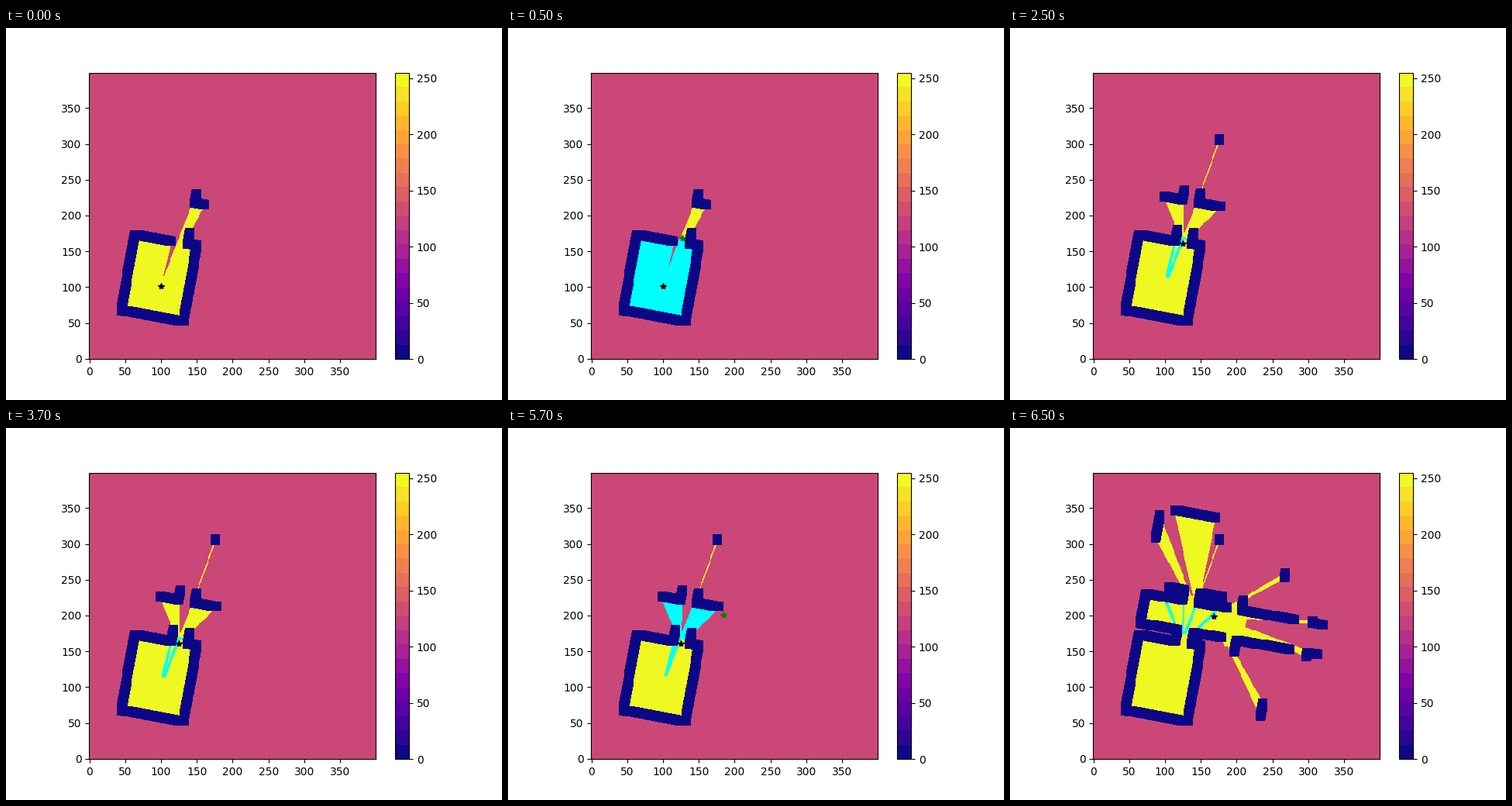
Animation of 640x480 px, one loop 8 s. Source, as a matplotlib script:

```python
import matplotlib.pyplot as plt
import numpy as np
from matplotlib.animation import FuncAnimation

WALL, UNKNOWN, FREE = 0, 128, 255
SIZE = 400
LEFT, BOTTOM, CELL = 107.2, 427.2, 369.6 / SIZE  # map area, in stage pixels

# The building is tilted: "along" runs down the corridor, "across" over it
CORNER = np.array([166.0, 267.0])
TILT = np.radians(10)
ALONG = np.array([np.cos(TILT), np.sin(TILT)])
ACROSS = np.array([-np.sin(TILT), np.cos(TILT)])

DOORS = [(48, 69.5), (106.5, 125), (195, 218)]
ROOMS = [(0, 81.6), (92, 173)]
CORRIDOR = (-54, -15)
CORRIDOR_END = 260
ROOM_SIDES = [(0, 99), (-67, -166)]  # door side and far side of both rows


def to_map(points):
    """Building coordinates to map coordinates."""
    points = np.asarray(points, float)
    stage = CORNER + points[..., :1] * ALONG + points[..., 1:] * ACROSS
    return (stage - (LEFT, BOTTOM)) / (CELL, -CELL) - 0.5


def plot_cells(mask, points):
    col, row = np.moveaxis(np.rint(to_map(points)).astype(int), -1, 0)
    mask[np.clip(row, 0, SIZE - 1), np.clip(col, 0, SIZE - 1)] = True


def grow(mask, n):
    """Widen a mask by n cells on every side."""
    for axis in (0, 1):
        mask = np.any([np.roll(mask, s, axis) for s in range(-n, n + 1)], axis=0)
    return mask


def build_walls():
    walls = [(0, CORRIDOR[0], 0, CORRIDOR[1])]
    ends = [0, *np.ravel(DOORS), CORRIDOR_END]
    for b in (*CORRIDOR, 0, -67):
        walls += [(a0, b, a1, b) for a0, a1 in zip(ends[::2], ends[1::2])]
    for a in np.ravel(DOORS):
        walls += [(a, -15, a, 0), (a, -67, a, -54)]
    for a0, a1 in ROOMS:
        for front, back in ROOM_SIDES:
            walls += [(a0, front, a0, back), (a1, front, a1, back),
                      (a0, back, a1, back)]
    return np.array(walls, float)


def cross(p, q):
    return p[..., 0] * q[..., 1] - p[..., 1] * q[..., 0]


def scan(position, reach=143, near=13, rays=3600):
    """Return the cells seen as free and the cells hit from a position."""
    angles = (np.arange(rays) + 0.3) * 2 * np.pi / rays
    rays_dir = np.column_stack([np.cos(angles), np.sin(angles)])
    start = WALLS[:, :2] - position
    edge = WALLS[:, 2:] - WALLS[:, :2]
    d = rays_dir[:, None]
    det = cross(d, edge)
    distance, place = cross(start, edge) / det, cross(start, d) / det
    valid = (distance > 0) & (place >= 0) & (place <= 1)
    distance = np.where(valid, distance, np.inf).min(axis=1)

    # Rays without an echo only clear the cells close to the robot
    echo = distance <= reach
    length = np.where(echo, distance, np.minimum(distance, near))
    free, hits = np.zeros((2, SIZE, SIZE), bool)
    steps = np.linspace(0, 1, 400)[None, :, None]
    plot_cells(free, position + rays_dir[:, None] * length[:, None, None] * steps)
    plot_cells(hits, (position + rays_dir * length[:, None])[echo])
    return free, hits


def merge(scans):
    free = np.any([s[0] for s in scans], axis=0)
    wall = grow(np.any([s[1] for s in scans], axis=0), 6)
    return free & ~wall, wall


def picture(free, wall):
    return np.where(wall, WALL, np.where(free, FREE, UNKNOWN))


def back_walls():
    """Room walls next to the first upper door."""
    hits = np.zeros((SIZE, SIZE), bool)
    for a0, a1 in ((28, 48), (69.5, 98)):
        a = np.arange(a0, a1, 0.5)
        plot_cells(hits, np.column_stack([a, np.full_like(a, -67)]))
    return np.zeros_like(hits), hits


WALLS = build_walls()
HOME, DOORWAY, HALL = (44.6, 59.4), (57.7, 0.8), (91.5, -41)
scans = [scan(HOME), scan(DOORWAY), scan((69, -41), reach=135),
         scan(HALL, near=42), back_walls()]
views = [merge(scans[:n]) for n in (1, 2, 5)]
pictures = [picture(*view) for view in views]

# Explored regions and the frontiers they leave open
cols, rows = np.meshgrid(np.arange(SIZE), np.arange(SIZE))
stage_x = LEFT + (cols + 0.5) * CELL
stage_y = BOTTOM - (rows + 0.5) * CELL
depth = (stage_x - CORNER[0]) * ACROSS[0] + (stage_y - CORNER[1]) * ACROSS[1]

(free_1, wall_1), (free_2, wall_2), _ = views
room = free_1 & (depth > -6)
beyond = free_2 & ~room & (depth > -50)


def frontier(region, explored, wall):
    return grow(region & grow(~explored & ~wall, 1), 1)


def cyan_layer(mask):
    layer = np.zeros((SIZE, SIZE, 4))
    layer[mask] = (0, 1, 1, 1)
    return layer


layers = [cyan_layer(mask) for mask in (
    np.zeros_like(room),
    grow(room, 1) & ~wall_1,
    frontier(room, room, wall_1) & ~wall_2,
    grow(beyond, 1) & ~wall_2,
    frontier(beyond, room | beyond, wall_2) & ~views[2][1],
)]

# Start, map, robot and goal of each stage
STAGES = [
    (0, 0, HOME, None),
    (500, 0, HOME, (58.4, -6.2)),
    (2500, 1, DOORWAY, None),
    (4500, 1, DOORWAY, (105.8, -45.4)),
    (6500, 2, HALL, None),
]
STEP = 500

fig = plt.figure(figsize=(6.4, 4.8), dpi=100)
ax = fig.add_subplot()
style = dict(origin="lower", interpolation="nearest")
image = ax.imshow(pictures[0], cmap="plasma", vmin=WALL, vmax=FREE, **style)
overlay = ax.imshow(layers[0], **style)
ax.set_xticks(range(0, 351, 50))
ax.set_yticks(range(0, 351, 50))
bands = plt.cm.ScalarMappable(plt.Normalize(WALL, FREE), plt.get_cmap("plasma", 20))
fig.colorbar(bands, ax=ax)
robot, = ax.plot([], [], "*", color="black", ms=6, zorder=4)
goal, = ax.plot([], [], "*", color="green", ms=6, zorder=3)
ax.set(xlim=(-0.5, SIZE - 0.5), ylim=(-0.5, SIZE - 0.5))


def place(star, position):
    star.set_visible(position is not None)
    if position is not None:
        x, y = to_map(position)
        star.set_data([x], [y])


def update(n):
    stage = max(i for i, s in enumerate(STAGES) if s[0] <= n * STEP)
    _, picture_index, robot_at, goal_at = STAGES[stage]
    image.set_data(pictures[picture_index])
    overlay.set_data(layers[stage])
    place(robot, robot_at)
    place(goal, goal_at)
    return image, overlay, robot, goal


anim = FuncAnimation(fig, update, frames=16, interval=STEP, repeat=True)
plt.show()
```
